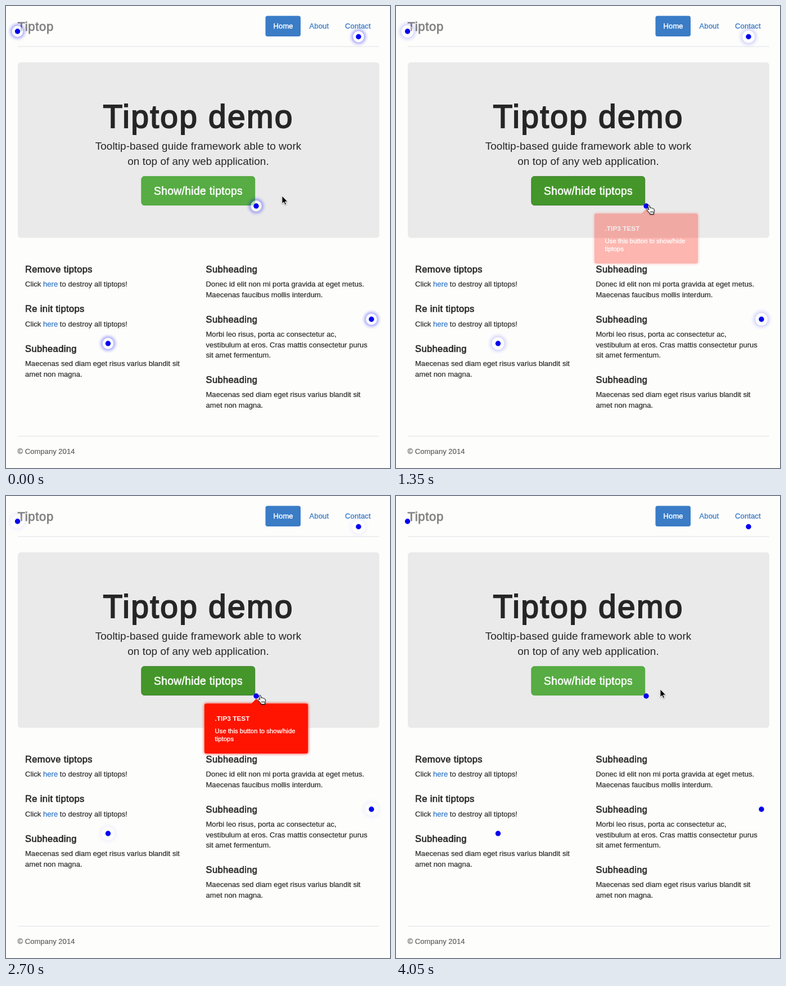
Animation of 683 by 820 pixels, one loop 4.1 s. Source, as an HTML page:

```html
<!DOCTYPE html>
<html lang="en">
<head>
<meta charset="utf-8">
<title>Tiptop demo</title>
<style>
  html, body { margin: 0; width: 100%; height: 100%; overflow: hidden; background: #fdfdfc; }
  svg { display: block; width: 100vw; height: 100vh; }
  text { font: 13px "Liberation Sans", Arial, sans-serif; fill: #262626; stroke: #262626; stroke-width: .18; letter-spacing: .04px; white-space: pre; }
  .h1 { font-size: 57px; letter-spacing: .039em; stroke-width: 1.9; }
  .h3 { font-size: 22px; letter-spacing: .03em; fill: #828282; stroke: #828282; stroke-width: .8; }
  .h4 { font-size: 16.5px; letter-spacing: .023em; stroke-width: .6; }
  .lead { font-size: 19px; letter-spacing: 0; stroke-width: 0; }
  .btn { font-size: 19.3px; letter-spacing: .018em; fill: #fff; stroke: #fff; stroke-width: .6; }
  .link { fill: #3a7cc6; stroke: #3a7cc6; stroke-width: .3; }
  .nav { letter-spacing: .01em; }
  .on { fill: #fff; stroke: #fff; stroke-width: .45; }
  .muted { fill: #5c5c5c; stroke: #5c5c5c; }
  .tipHead { font-size: 11.8px; font-weight: bold; fill: #fff; stroke: none; }
  .tipBody { font-size: 11.3px; fill: #fff; stroke: #fff; stroke-width: .3; }
</style>
</head>
<body>
<svg viewBox="0 0 683 820">
  <defs>
    <radialGradient id="glow">
      <stop offset=".55" stop-color="#00f" stop-opacity=".5"/>
      <stop offset=".68" stop-color="#00f" stop-opacity=".32"/>
      <stop offset=".83" stop-color="#00f" stop-opacity=".11"/>
      <stop offset="1" stop-color="#00f" stop-opacity="0"/>
    </radialGradient>
    <filter id="soft" x="-20%" y="-30%" width="140%" height="160%">
      <feGaussianBlur stdDeviation="2.6"/>
    </filter>
    <filter id="drop" x="-50%" y="-50%" width="200%" height="200%">
      <feDropShadow dx="0" dy="1" stdDeviation=".8" flood-opacity=".35"/>
    </filter>
  </defs>
  <rect x="461.5" y="17.5" width="62.5" height="36.5" rx="3.7" fill="#3a7cc6"/>
  <path d="M21 72H664M21 763.5H664" stroke="#dfe0e6"/>
  <rect x="21" y="100" width="643" height="311.5" rx="5.5" fill="#eaeaea"/>
  <rect id="button" x="240.9" y="302.4" width="201.8" height="51.2" rx="5.2"/>
  <g id="copy"></g>
  <g id="tip">
    <rect x="353" y="368.5" width="184" height="88.5" rx="3" fill="#fe1400" filter="url(#soft)"/>
    <rect x="353" y="368.5" width="184" height="88.5" rx="3" fill="#fe1400"/>
    <path d="M436 369L445 360L454 369Z" fill="#fe1400"/>
  </g>
  <g id="beacons"></g>
  <g id="cursor" filter="url(#drop)">
    <path id="arrow" d="M0 0V14L3.2 11L5.4 16L7.6 15L5.4 10.2H9.8Z" stroke="#fff" stroke-width=".9"/>
    <g id="hand" fill="#fff" stroke="#000" stroke-linejoin="round">
      <path d="M1.2 1.4C1.8 0 3.6 .2 4 1.8L5 5.6C6 4.8 7.2 5 7.6 6C8.6 5.4 9.6 5.8 9.9 6.8C11 6.4 12 7.2 12.2 8.6C12.6 11 12.2 12.6 11.4 14V16.6H4.8L4.6 15C3 13.6 1.4 11.6 -.4 9.4C-1.4 8 .2 7 1.4 7.8L2.8 9Z"/>
      <path d="M6 11V14M8 11V14M10 11V14" stroke-width=".8"/>
    </g>
  </g>
</svg>
<script>
const LOOP = 4100, PULSE = 1200, PULSE_START = 440;
const HOVER_IN = 1250, HOVER_OUT = 2900, FADE = 500;
const $ = id => document.getElementById(id);

function add(parent, name, attrs, text) {
  const el = document.createElementNS("http://www.w3.org/2000/svg", name);
  for (const key in attrs) el.setAttribute(key, attrs[key]);
  if (text) el.textContent = text;
  return parent.appendChild(el);
}

const write = (x, y, text, cls = "", parent = $("copy")) =>
  add(parent, "text", { x, y, class: cls }, text);

function center(y, text, cls) {
  write(342, y, text, cls).setAttribute("text-anchor", "middle");
}

function section(x, y, title, lines) {
  write(x, y, title, "h4");
  lines.forEach((line, i) => {
    const [before, link, after] = line.split("|");
    const el = write(x, y + 25.6 + i * 18.4, before);
    if (link) {
      add(el, "tspan", { class: "link" }, link);
      add(el, "tspan", {}, after);
    }
  });
}

write(20.5, 44, "Tiptop", "h3");
write(475.5, 40.3, "Home", "nav on");
write(539.5, 40.3, "About", "nav link");
write(603, 40.3, "Contact", "nav link");
center(215.6, "Tiptop demo", "h1");
center(254.8, "Tooltip-based guide framework able to work", "lead");
center(281.6, "on top of any web application.", "lead");
center(335, "Show/hide tiptops", "btn");

const destroy = ["Click |here| to destroy all tiptops!"];
const maecenas = ["Maecenas sed diam eget risus varius blandit sit", "amet non magna."];
section(34, 472.5, "Remove tiptops", destroy);
section(34, 543.2, "Re init tiptops", destroy);
section(34, 613.8, "Subheading", maecenas);
section(355.5, 472.5, "Subheading", ["Donec id elit non mi porta gravida at eget metus.", "Maecenas faucibus mollis interdum."]);
section(355.5, 561.5, "Subheading", ["Morbi leo risus, porta ac consectetur ac,", "vestibulum at eros. Cras mattis consectetur purus", "sit amet fermentum."]);
section(355.5, 668.8, "Subheading", maecenas);
write(20.5, 795.3, "© Company 2014", "muted");

write(371.5, 398.7, ".TIP3 TEST", "tipHead", $("tip"));
write(371.5, 421, "Use this button to show/hide", "tipBody", $("tip"));
write(371.5, 435, "tiptops", "tipBody", $("tip"));

const spots = [[20.5, 45], [627, 54.5], [445, 355], [650, 556], [181.5, 599]];
const halos = spots.map(([x, y]) => {
  const g = add($("beacons"), "g", { transform: `translate(${x} ${y})` });
  const halo = add(g, "g", {});
  add(halo, "circle", { r: 18, fill: "url(#glow)" });
  add(halo, "circle", { r: 9.9, fill: "#fff" });
  add(g, "circle", { r: 4.7, fill: "#0000f0" });
  return halo;
});
const buttonHalo = halos[2];

const clamp = v => Math.min(1, Math.max(0, v));

// CSS-style cubic-bezier timing
function bezier(x1, y1, x2, y2) {
  const at = (a, b, s) => 3 * (1 - s) * (1 - s) * s * a + 3 * (1 - s) * s * s * b + s * s * s;
  return x => {
    let lo = 0, hi = 1;
    for (let i = 0; i < 24; i++) {
      const mid = (lo + hi) / 2;
      if (at(x1, x2, mid) < x) lo = mid; else hi = mid;
    }
    return at(y1, y2, (lo + hi) / 2);
  };
}
const easeOut = bezier(0, 0, .58, 1);
const ease = bezier(.25, .1, .25, 1);

// time, x, y
const path = [
  [0, 491, 337], [1000, 464, 348], [1250, 447, 353], [2550, 447, 353],
  [2700, 449, 353], [2850, 451, 352], [3050, 470, 343], [LOOP, 470, 343]
];

function pointer(t) {
  const i = path.findIndex(p => p[0] > t);
  const a = path[i - 1], b = path[i];
  const k = (t - a[0]) / (b[0] - a[0]);
  return [a[1] + (b[1] - a[1]) * k, a[2] + (b[2] - a[2]) * k];
}

function draw(t) {
  const p = ((t - PULSE_START + PULSE) % PULSE) / PULSE;
  const scale = .1 + 1.1 * easeOut(p);
  const alpha = p < .5 ? easeOut(p * 2) : 1 - easeOut(p * 2 - 1);
  for (const halo of halos) {
    halo.setAttribute("transform", `scale(${scale})`);
    halo.setAttribute("opacity", alpha);
  }

  const hover = t >= HOVER_IN && t < HOVER_OUT;
  if (hover) buttonHalo.setAttribute("opacity", 0);
  $("button").setAttribute("fill", hover ? "#44962a" : "#57ac43");
  $("button").setAttribute("stroke", hover ? "#38792c" : "#4da53c");

  const shown = t < HOVER_OUT
    ? ease(clamp((t - HOVER_IN) / FADE))
    : 1 - ease(clamp((t - HOVER_OUT) / FADE));
  $("tip").setAttribute("opacity", shown);

  $("cursor").setAttribute("transform", `translate(${pointer(t)})`);
  $("arrow").setAttribute("visibility", hover ? "hidden" : "visible");
  $("hand").setAttribute("visibility", hover ? "visible" : "hidden");
}

const start = performance.now();
function tick() {
  draw((performance.now() - start) % LOOP);
  requestAnimationFrame(tick);
}
tick();
</script>
</body>
</html>
```
